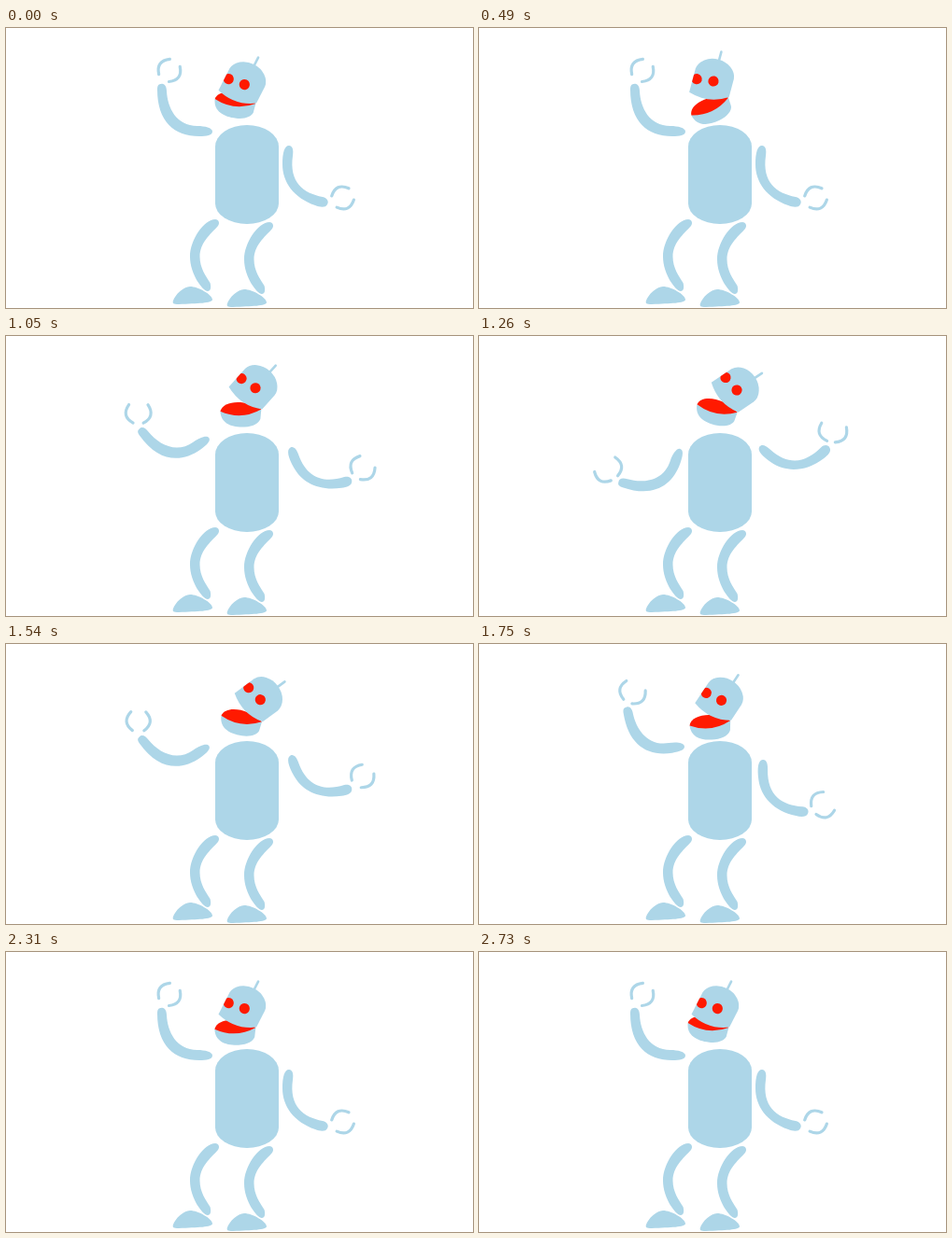
Recreate the animation shown at these times as an HTML page with a canvas. Size 500x300 px, loop 3850 ms.

```html
<!DOCTYPE html>
<html lang="en">
<head>
<meta charset="utf-8">
<title>Dancing robot</title>
<style>
  html, body { margin: 0; width: 100%; height: 100%; overflow: hidden; background: #fff; }
  canvas { display: block; }
</style>
</head>
<body>
<canvas id="stage" width="500" height="300"></canvas>
<script>
const ctx = document.getElementById('stage').getContext('2d');
const BLUE = '#add6e8', RED = '#ff1a00';
const LOOP = 3850, STEP = 70, LAST = 2730;

const body = new Path2D('M224 127A34 23 0 0 1 292 127V188A34 22 0 0 1 224 188Z');
const leg = new Path2D('M224 205C228 205 229 209 227 212C219 221 207.5 230 207.5 245C207.5 257 214 266 218.5 273C220 278 219 282 216 282C211 282 197 264 197 245C197 227 212 205 224 205Z');
const foot = new Path2D('M179 292C181 286 190 277 197 277C206 277 221 286 221 291C221 295 205 295 185 296C179 296 178 295 179 292Z');
const skull = new Path2D('M-22 18V-8A21.3 17 0 0 1 20.5 -8V12Q1 25 -22 18Z');
// Jaw and mouth hang from the hinge at their right end.
const jaw = new Path2D('M-44 0C-44 13 -33 18 -19 18C-9 18 -3 14 -1.5 10L0 0Z');
const mouth = new Path2D('M-44 0C-41 -12 -16 -12 0 0Q-22 11 -44 0Z');

// Each shoulder drifts towards the far end of the swing and lifts half way.
const arms = [
  {
    shape: new Path2D('M166 60C170 59 172 63 172 68C173 85 182 105 205 105C213 105 221 107 221 111C221 115 215 116 207 116C180 116 162 100 162 66C162 62 163 60 166 60Z'),
    shoulder: [221, 111], hand: [172, 49.5], axis: 36,
    turn: -71, drift: [-5.5, 10], lift: [-1, -7]
  },
  {
    shape: new Path2D('M303 126C307 126 308 131 307 137C303 165 318 177 339 181C344 182 346 186 344 189C342 193 336 192 331 190C308 182 296 165 296 146C296 134 298 126 303 126Z'),
    shoulder: [303, 125], hand: [356, 184], axis: 66,
    turn: -56, drift: [-3.5, -7], lift: [2.8, -3]
  }
];

// Head poses: x, y, tilt
const rest = [255.3, 60.6, 27], nod = [251, 57, 15], rise = [258, 53.5, 28];
const lean = [276, 58, 56], settle = [272.3, 59.7, 53.5];
const headKeys = [[0, rest], [490, nod], [840, rise], [1260, lean], [1540, settle], [1820, rest]];
const gripKeys = [[840, [0]], [1260, [27]], [1540, [5]], [1960, [32]], [2240, [0]]];

const clamp = v => Math.max(0, Math.min(1, v));
// Rises from a to b, holds, then falls from c to d.
const ramp = (t, a, b, c, d) => clamp(Math.min((t - a) / (b - a), (d - t) / (d - c)));

function sample(keys, t) {
  let [from, pose] = keys[0];
  for (const [to, next] of keys.slice(1)) {
    const f = clamp((t - from) / (to - from));
    pose = pose.map((v, i) => v + (next[i] - v) * f);
    from = to;
  }
  return pose;
}

function at(x, y, deg, draw) {
  ctx.save();
  ctx.translate(x, y);
  ctx.rotate(deg * Math.PI / 180);
  draw();
  ctx.restore();
}

function fill(path, color = BLUE) {
  ctx.fillStyle = color;
  ctx.fill(path);
}

function line(d, width) {
  ctx.lineWidth = width;
  ctx.stroke(new Path2D(d));
}

function drawHand(grip) {
  for (const side of [-1, 1]) {
    at(side * 6.7, grip / 16, side * grip, () => line(`M0 5Q${side * 11} -5 0 -15`, 3.2));
  }
}

function drawArm(arm, swing, grip) {
  const bump = Math.sin(Math.PI * swing);
  const [x, y] = arm.shoulder.map((v, i) => v + arm.drift[i] * swing + arm.lift[i] * bump);
  at(x, y, arm.turn * swing, () => {
    ctx.translate(-arm.shoulder[0], -arm.shoulder[1]);
    fill(arm.shape);
    at(...arm.hand, arm.axis, () => drawHand(grip));
  });
}

function drawEye(x, y) {
  ctx.beginPath();
  ctx.arc(x, y, 5.6, 0, 2 * Math.PI);
  ctx.fill();
}

function drawHead(t) {
  const [x, y, tilt] = sample(headKeys, t);
  const gape = 20.5 + 24.5 * ramp(t, 0, 600, 1540, LAST);
  at(x, y, tilt, () => {
    at(20, 12.7, -gape, () => {
      fill(jaw);
      fill(mouth, RED);
    });
    line('M0 -22V-32.5', 2.6);
    fill(skull);
    ctx.clip(skull);
    ctx.fillStyle = RED;
    drawEye(0, 0);
    drawEye(-17.9, 2.4);
  });
}

function drawLeg() {
  fill(leg);
  fill(foot);
}

function render(t) {
  ctx.fillStyle = '#fff';
  ctx.fillRect(0, 0, 500, 300);
  ctx.strokeStyle = BLUE;
  ctx.lineCap = 'round';
  drawLeg();
  at(58, 3, 0, drawLeg);
  fill(body);
  const swing = ramp(t, 840, 1260, 1260, 1820);
  const [grip] = sample(gripKeys, t);
  arms.forEach(arm => drawArm(arm, swing, grip));
  drawHead(t);
}

const start = performance.now();
function tick() {
  const t = (performance.now() - start) % LOOP;
  render(Math.min(LAST, Math.floor(t / STEP) * STEP));
  requestAnimationFrame(tick);
}
tick();
</script>
</body>
</html>
```
